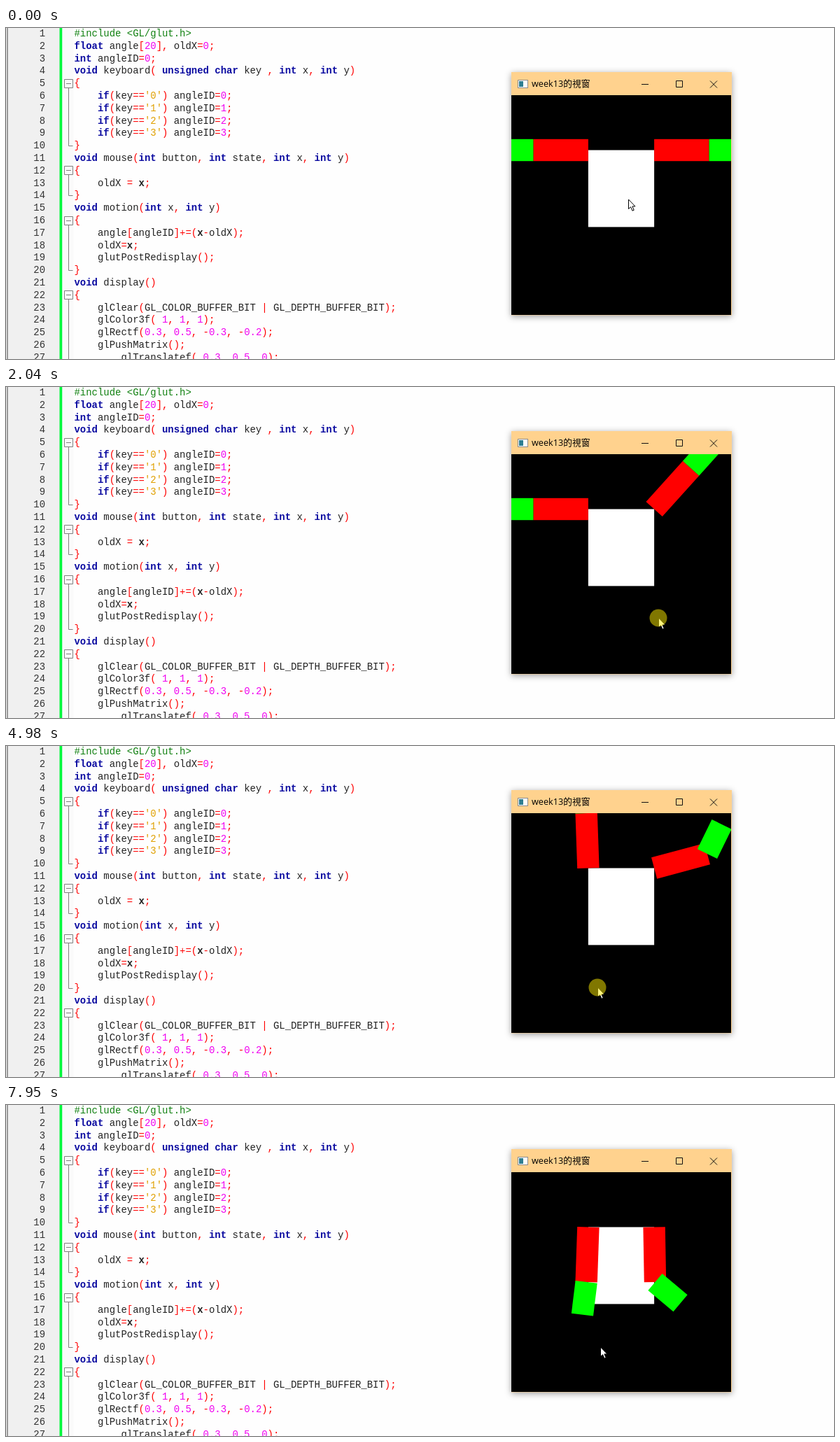
Recreate the animation shown at these times as an HTML page. Size 1183 by 473 pixels, loop 8350 ms.

```html
<!DOCTYPE html>
<html lang="en">
<head>
<meta charset="utf-8">
<style>
  html, body { margin: 0; width: 100%; height: 100%; overflow: hidden; background: #fefefe; }
  main { position: absolute; inset: 0; overflow: hidden; contain: strict; }
  pre, .stage { position: absolute; margin: 0; top: 0; left: 0; }
  pre { font: 13.95px/17.8px "Liberation Mono", "Courier New", monospace; color: #222; }
  #code { left: 97.5px; }
  #numbers { width: 56px; text-align: right; color: #333; }
  .directive { color: #108010; }
  .keyword { color: #0a0aa0; font-weight: bold; }
  .char { color: #e0a000; }
  .number { color: #f000f0; }
  .operator { color: #f00; }
  .strong { font-weight: bold; }
  .title { font: 12.7px "Open Sans", "Noto Sans CJK TC", "Noto Sans CJK JP", "Noto Sans CJK", sans-serif; }
  .window { filter: drop-shadow(0 2px 5px rgba(0, 0, 0, .38)); }
</style>
</head>
<body>
<main>
<svg class="stage" width="1183" height="473">
  <rect width="77" height="473" fill="#f0f0f0"/>
  <rect x="1" width="2" height="473" fill="#999"/>
  <rect x="76.5" width="4" height="473" fill="#00f83c"/>
  <rect x="80.5" width="16" height="473" fill="#fafafa"/>
  <path id="folds" fill="none" stroke="#808080"/>

  <rect class="window" x="722" y="63" width="315" height="347.5" fill="#ffd28e"/>
  <rect x="731.5" y="74.5" width="14" height="11" fill="#fff" stroke="#8a8a8a"/>
  <rect x="733" y="76" width="6" height="8" fill="#2f7f92"/>
  <text class="title" x="751" y="84">week13的視窗</text>
  <path d="M908 80.5h10M957.5 75.5h9v9h-9zM1006 75.5l10 10m0-10l-10 10" fill="none" stroke="#111"/>

  <svg x="722" y="96" width="314" height="314" viewBox="-1 -1 2 2">
    <rect x="-1" y="-1" width="2" height="2"/>
    <rect x="-.3" y="-.5" width=".6" height=".7" fill="#fff"/>
    <g transform="translate(.3 -.5)">
      <g id="rightArm">
        <rect y="-.1" width=".5" height=".2" fill="#f00"/>
        <g transform="translate(.5)"><rect id="rightHand" y="-.1" width=".3" height=".2" fill="#0f0"/></g>
      </g>
    </g>
    <g transform="translate(-.3 -.5)">
      <g id="leftArm">
        <rect x="-.5" y="-.1" width=".5" height=".2" fill="#f00"/>
        <g transform="translate(-.5)"><rect id="leftHand" x="-.3" y="-.1" width=".3" height=".2" fill="#0f0"/></g>
      </g>
    </g>
  </svg>

  <g id="cursor">
    <path d="M.5 0V13.5L3.6 10.7 6 16.2 8.2 15.2 5.9 9.9H10Z" fill="#fff" stroke="#000"/>
    <circle id="press" r="12.5" fill="#ffee00" fill-opacity=".5"/>
  </g>
</svg>
<pre id="numbers"></pre>
<pre id="code">#include &lt;GL/glut.h>
float angle[20], oldX=0;
int angleID=0;
void keyboard( unsigned char key , int x, int y)
{
    if(key=='0') angleID=0;
    if(key=='1') angleID=1;
    if(key=='2') angleID=2;
    if(key=='3') angleID=3;
}
void mouse(int button, int state, int x, int y)
{
    oldX = x;
}
void motion(int x, int y)
{
    angle[angleID]+=(x-oldX);
    oldX=x;
    glutPostRedisplay();
}
void display()
{
    glClear(GL_COLOR_BUFFER_BIT | GL_DEPTH_BUFFER_BIT);
    glColor3f( 1, 1, 1);
    glRectf(0.3, 0.5, -0.3, -0.2);
    glPushMatrix();
        glTranslatef( 0.3, 0.5, 0);</pre>
</main>
<script>
const $ = id => document.getElementById(id);
const lines = $('code').textContent.split('\n');

// Syntax colouring
const tokens = /(?<directive>^#.*)|(?<keyword>\b(?:void|int|float|unsigned|char|if)\b)|(?<char>'.')|(?<number>\b\d+(?:\.\d+)?)|(?<strong>(?<!int )\bx\b)|(?<operator>[^\w\s'])/gm;
$('code').innerHTML = $('code').textContent.replace(tokens, (text, ...rest) => {
  const groups = rest.at(-1);
  const kind = Object.keys(groups).find(name => groups[name]);
  return `<span class="${kind}">${text.replace('<', '&lt;')}</span>`;
});
$('numbers').textContent = lines.map((_, i) => i + 1).join('\n');

// A fold box at every opening brace, with a line down to the closing one
const lineY = i => Math.round(17.8 * i + 7.5) + .5;
$('folds').setAttribute('d', lines.map((line, i) => {
  if (line !== '{') return '';
  const close = lines.indexOf('}', i);
  return `M83.5 ${lineY(i) - 6}h12v12h-12zM86 ${lineY(i)}h7M89.5 ${lineY(i) + 6}` +
    `V${lineY(close < 0 ? lines.length : close)}h6`;
}).join(''));

const LOOP = 8350, STEP = 70;

// Pointer moves through evenly timed points; a drag turns its part one degree per pixel.
// Past the window edge a drag turns nothing.
const moves = [
  { start: 200, end: 270, points: [[889, 245], [884, 246]] },
  { start: 730, end: 2450, drag: 'rightArm',
    points: [[884, 246], [930, 280], [844, 311], [910, 325], [935, 331], [899, 323]] },
  { start: 2780, end: 4160, drag: 'rightHand',
    points: [[899, 323], [898, 324], [948, 331], [848, 336], [948, 347]] },
  { start: 4630, end: 5690, drag: 'leftArm', points: [[933, 350], [845, 345], [845, 345], [1021, 355]] },
  { start: 5690, end: 5960, drag: 'outside', points: [[1021, 355], [1037, 350], [1037, 350]] },
  { start: 6300, end: 7000, drag: 'leftHand', points: [[966, 349], [896, 349], [961, 350]] },
  { start: 7270, end: 7900, drag: 'rightArm', points: [[953, 350], [849, 346]] },
];

const clamp = f => Math.min(1, Math.max(0, f));
const ease = f => f * f * (3 - 2 * f);

function along(points, f) {
  const pos = clamp(f) * (points.length - 1);
  const i = Math.min(Math.floor(pos), points.length - 2);
  return points[i].map((v, axis) => Math.round(v + (points[i + 1][axis] - v) * ease(pos - i)));
}

function draw(now) {
  const t = Math.floor(now % LOOP / STEP) * STEP;
  const angles = { rightArm: 0, rightHand: 0, leftArm: 0, leftHand: 0 };
  let place = moves[0].points[0], pressed = false, lastEnd = 0;
  for (const { start, end, drag, points } of moves) {
    if (t < start) {
      // Rest, then glide to where the next move begins
      const middle = (lastEnd + start) / 2;
      place = along([place, points[0]], (t - middle) / (start - middle));
      break;
    }
    place = along(points, (t - start) / (end - start));
    if (drag in angles) angles[drag] += place[0] - points[0][0];
    pressed = Boolean(drag) && t < end;
    lastEnd = end;
  }
  for (const part in angles) $(part).setAttribute('transform', `rotate(${-angles[part]})`);
  $('cursor').setAttribute('transform', `translate(${place})`);
  $('press').setAttribute('visibility', pressed ? 'visible' : 'hidden');
}

const begin = performance.now();
(function tick() {
  draw(performance.now() - begin);
  requestAnimationFrame(tick);
})();
</script>
</body>
</html>
```
